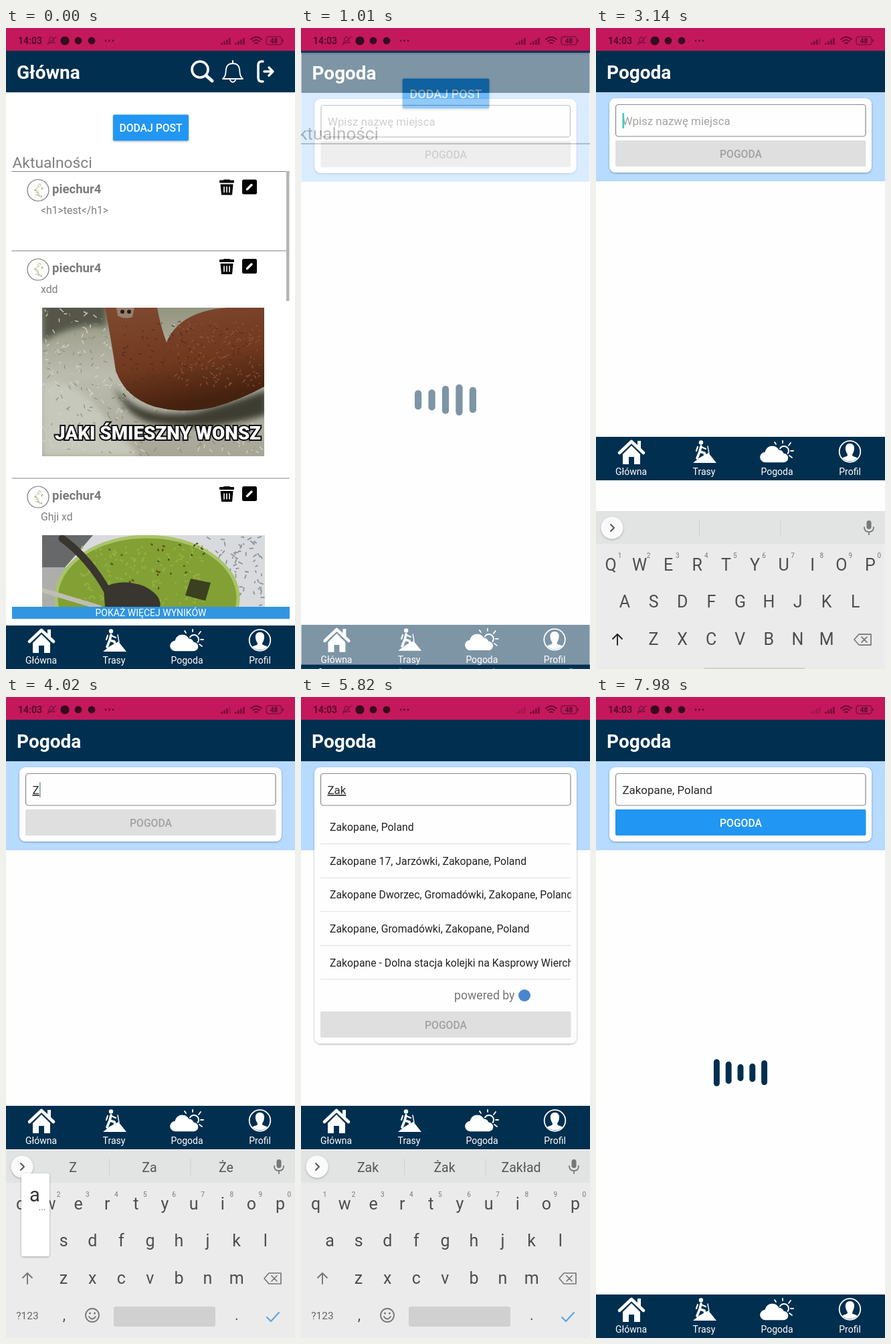
An HTML page for the animation above (8000 ms loop, 432 by 958 pixels).

```html
<!DOCTYPE html>
<html lang="pl">
<head>
<meta charset="utf-8">
<title>Pogoda</title>
<style>
  html, body { margin: 0; width: 100%; height: 100%; overflow: hidden; background: #fff; }
  svg { display: block; width: 100%; height: 100%; font-family: Roboto, sans-serif; }
</style>
</head>
<body>
<svg viewBox="0 0 432 958">
  <defs>
    <filter id="soft" x="-10%" y="-10%" width="120%" height="125%">
      <feDropShadow dx="0" dy="1" stdDeviation="1.6" flood-opacity=".32"/>
    </filter>
    <filter id="blur"><feGaussianBlur stdDeviation="5"/></filter>
    <linearGradient id="fur" x2=".3" y2="1">
      <stop stop-color="#7f4a31"/><stop offset=".6" stop-color="#71391f"/><stop offset="1" stop-color="#45210f"/>
    </linearGradient>
    <linearGradient id="hay" x2="0" y2="1">
      <stop stop-color="#93957f"/><stop offset=".45" stop-color="#bbbcae"/><stop offset="1" stop-color="#a5a696"/>
    </linearGradient>
  </defs>
  <defs id="parts"></defs>
  <g id="stage"></g>
</svg>
<script>
const LOOP = 8000, NAVY = '#002f4f', BLUE = '#2196f3';
const clamp = v => Math.min(1, Math.max(0, v));
const span = (t, from, to) => clamp((t - from) / (to - from));
const easeOut = (u, power = 3) => 1 - (1 - u) ** power;

// SVG helpers
const text = (x, y, size, str, fill = '#333', more = '') =>
  `<text x="${x}" y="${y}" font-size="${size}" fill="${fill}" ${more}>${str}</text>`;
const mid = (x, y, size, str, fill, more = '') => text(x, y, size, str, fill, `text-anchor="middle" ${more}`);
const rect = (x, y, w, h, fill, r = 0, more = '') =>
  `<rect x="${x}" y="${y}" width="${w}" height="${h}" rx="${r}" fill="${fill}" ${more}/>`;
const circle = (x, y, r, fill, more = '') => `<circle cx="${x}" cy="${y}" r="${r}" fill="${fill}" ${more}/>`;
const shape = (d, fill, more = '') => `<path d="${d}" fill="${fill}" ${more}/>`;
const line = (d, color, width = 1) =>
  `<path d="${d}" fill="none" stroke="${color}" stroke-width="${width}" stroke-linecap="round" stroke-linejoin="round"/>`;
const clip = (x, y, w, h, body) =>
  `<svg x="${x}" y="${y}" width="${w}" height="${h}" viewBox="${x} ${y} ${w} ${h}">${body}</svg>`;
const group = (id, body) => `<g id="${id}">${body}</g>`;
const use = (id, x = 0, y = 0) => `<use href="#${id}" x="${x}" y="${y}"/>`;
const BOLD = 'font-weight="700"', MEDIUM = 'font-weight="500"', BLURRED = 'filter="url(#blur)"';

function seeded(seed) {
  return () => (seed = (seed * 16807) % 2147483647) / 2147483647;
}

// Short random strokes spread over a box
function strands(seed, count, x, y, w, h, length) {
  const rnd = seeded(seed);
  let d = '';
  for (let i = 0; i < count; i++) {
    const dx = (rnd() - .5) * length, dy = (rnd() - .5) * length;
    d += `M${(x + rnd() * w).toFixed(1)} ${(y + rnd() * h).toFixed(1)}l${dx.toFixed(1)} ${dy.toFixed(1)}`;
  }
  return d;
}

const topIcons =
  circle(290, 62, 12, 'none', 'stroke="#fff" stroke-width="3.6"') + line('M299 71L308 79', '#fff', 5) +
  line('M324 76C330 71 328 66 329 61C330 55 334 53 339 53C344 53 348 55 349 61C350 66 348 71 354 76Z', '#fff', 1.8) +
  line('M339 52V49M335 78Q339 84 343 78', '#fff', 2) +
  line('M384 50H382Q377 50 377 56V74Q377 80 382 80H384', '#fff', 3.6) +
  line('M386 65H398M393 59L399 65L393 71', '#fff', 3.4);

const tabIcons =
  line('M35 917L53 900L71 917', '#fff', 4.6) + shape('M62 899H67V911L62 906Z', '#fff') +
  shape('M53 906L66 919V934H57V923H49V934H40V919Z', '#fff') +
  circle(157, 901.5, 3.2, '#fff') + shape('M145 932L155 924L168 917L180 932Z', '#fff') +
  line('M157 907L155 915L151 925M155 915L162 917L163 921', '#fff', 3.6) +
  line('M157 908L164 911M152 908L150 914', '#fff', 2.2) + line('M167 907L169 918', '#fff', 1.4) +
  circle(281, 914, 7, 'none', 'stroke="#fff" stroke-width="2"') +
  line('M269 904L267 901M279 902V899M288 906L291 902M291 914H295M289 921L293 924', '#fff', 1.8) +
  shape('M254 932A8 8 0 0 1 252 915A12 12 0 0 1 274 912A8 8 0 0 1 281 917A7.5 7.5 0 0 1 280 932Z', '#fff', `stroke="${NAVY}" stroke-width="1.5"`) +
  circle(379.5, 915, 15.8, 'none', 'stroke="#fff" stroke-width="1.8"') +
  shape('M379.5 903C373 903 372 909 373.5 914C374 917 376 918 376 921C374 923 370 923 368 925Q379.5 934 391 925C389 923 385 923 383 921C383 918 385 917 385.5 914C387 909 386 903 379.5 903Z', '#fff');

const tabs = rect(0, 893, 432, 65, NAVY) + tabIcons +
  ['Główna', 'Trasy', 'Pogoda', 'Profil'].map((label, i) => mid(52.5 + 109 * i, 950, 14, label, '#fff')).join('');

const llama = clip(54, 418, 332, 222,
  rect(54, 418, 332, 222, 'url(#hay)') +
  shape('M54 410H150V446Q100 440 54 470Z', '#54574a', BLURRED) +
  shape('M54 530Q90 520 130 560L200 640H54Z', '#c6c8bb', BLURRED) +
  line(strands(7, 260, 58, 422, 324, 214, 11), '#d2d3c6', 1.3) +
  line(strands(23, 220, 58, 422, 324, 214, 10), '#85877a', 1.1) +
  shape('M160 535Q200 590 290 572Q350 556 390 540V578Q300 606 215 590Q180 580 160 535Z', '#3c3c32', BLURRED) +
  shape('M148 418H226Q231 446 240 470Q256 430 312 420L330 418H386V536Q350 556 310 567Q265 577 222 566Q178 552 164 512Q158 470 148 418Z', 'url(#fur)') +
  shape('M165 418H192L189 432Q177 436 167 430Z', '#96806f') + circle(174, 424, 3, '#2b1a14') + circle(184, 424, 3, '#2b1a14') +
  line(strands(41, 150, 254, 436, 126, 100, 8), '#8d553b', 1.2) +
  line(strands(53, 130, 174, 440, 190, 112, 8), '#55291a', 1.2) +
  mid(227, 615, 27.8, 'JAKI ŚMIESZNY WONSZ', '#fff', 'font-weight="900" stroke="#111" stroke-width="4" paint-order="stroke"'));

const bowl = clip(54, 758, 333, 107,
  rect(54, 758, 333, 107, '#d9dadd') + line(strands(11, 90, 300, 760, 85, 103, 10), '#8d929c', 1.8) +
  shape('M54 758H130L76 820H54Z', '#66686a') + rect(54, 806, 40, 59, '#adaeac') +
  `<ellipse cx="211" cy="852" rx="136" ry="92" fill="#82a033" stroke="#a9c46a" stroke-width="5"/>` +
  line(strands(31, 140, 110, 775, 190, 88, 6), '#93b045', 2.4) +
  line(strands(17, 30, 150, 770, 150, 80, 4), '#4e4a1d', 2.2) +
  shape('M276 823L306 829L298 856L268 848Z', '#3a4020') +
  line('M84 763Q124 792 152 842', '#39352f', 11) +
  shape('M146 836Q172 822 206 834Q234 848 230 866H148Z', '#39352f') +
  line('M54 840L140 866', '#bfbdb4', 7));

const post = (y, body) => line(`M9 ${y}H423`, '#808080', 1.2) +
  circle(48, y + 28, 16, '#fdfdfb', 'stroke="#777" stroke-width="1.2"') +
  line(strands(9, 16, 42, y + 18, 13, 20, 7), '#a9ad80', 1) +
  text(69, y + 32, 18.6, 'piechur4', '#7b7b7b', BOLD) +
  rect(319, y + 13, 22, 4, '#000', 1) + rect(325, y + 12, 10, 3, '#000', 1) +
  shape(`M320.5 ${y + 19}H339.5L338 ${y + 35}H322Z`, '#000') +
  line(`M326 ${y + 23}V${y + 31}M330 ${y + 23}V${y + 31}M334 ${y + 23}V${y + 31}`, '#fff', 1.6) +
  rect(353, y + 12, 22, 22, '#000', 2.5) + line(`M360.5 ${y + 26.5}L367 ${y + 20}`, '#fff', 3.4) +
  text(52, y + 63, 15.8, body, '#808080');

const feed = post(214.5, '&lt;h1&gt;test&lt;/h1&gt;') + post(333, 'xdd') + llama + post(673, 'Ghji xd') + bowl +
  rect(419, 214, 4.5, 194, '#b5b5b5') + rect(9, 865, 415, 18, '#3195e0') +
  mid(216.5, 879, 14, 'POKAŻ WIĘCEJ WYNIKÓW', '#fff');

const screen = (title, background) => rect(0, 34, 432, 924, background) + rect(0, 96, 432, 2, '#e7e9eb') +
  rect(0, 34, 432, 62, NAVY) + text(16, 76, 28, title, '#fff', BOLD);

const homeTop = screen('Główna', '#fff') + topIcons +
  rect(160, 129.5, 113, 39, BLUE, 2, 'filter="url(#soft)"') +
  mid(216.5, 155, 15.7, 'DODAJ POST', '#fff', MEDIUM) +
  text(9.5, 209, 22.8, 'Aktualności', '#808080') + line('M9 214.5H423', '#808080', 1.2) + use('tabs');

const PLACES = ['Zakopane, Poland', 'Zakopane 17, Jarzówki, Zakopane, Poland',
  'Zakopane Dworzec, Gromadówki, Zakopane, Poland', 'Zakopane, Gromadówki, Zakopane, Poland',
  'Zakopane - Dolna stacja kolejki na Kasprowy Wierch'];
const places = clip(29, 166, 374.5, 300,
  PLACES.map((place, i) => text(43, 200 + 50.7 * i, 15.8, place, '#222') +
    line(`M29 ${219.5 + 50.6 * i}H404`, '#dedede')).join('') +
  text(229, 452, 17.7, 'powered by', '#757575') + circle(334, 446, 9, '#4a86cf'));

const signal = (x, full, faint) => [0, 1, 2, 3].map(i =>
  rect(x + i * 4, 22 - i * 2.4, 2.8, 3 + i * 2.4, '#6b0c34', 0, `opacity="${i < full ? (faint ? .35 : .8) : .3}"`)).join('');
const statusBar = rect(0, 0, 432, 34, '#c4185c') + text(18, 24, 14, '14:03', '#560a2b', BOLD) +
  line('M63 22H73L71 19V16Q68 11 65 16V19ZM62 25L75 13', '#7a1240', 1.3) +
  [88, 108, 128].map((x, i) => circle(x, 19, i ? 5.4 : 6.6, '#360a1e')).join('') +
  [149, 154.5, 160].map(x => circle(x, 19, 1.4, '#560a2b')).join('') +
  line('M366 17Q374 10 382 17M369 20Q374 15.5 379 20M372 23Q374 21 376 23', '#6b0c34', 2) +
  rect(389, 13, 23, 12, 'none', 3.5, 'stroke="#7a1240" stroke-width="1.5"') + rect(413, 17, 2, 4, '#7a1240') +
  mid(400.5, 23, 10, '48', '#560a2b', BOLD);

document.getElementById('parts').innerHTML = group('tabs', tabs) + group('feed', feed) +
  group('homeTop', homeTop) + group('places', places) + group('statusBar', statusBar);

// Keyboard
const ROWS = [['qwertyuiop', 22, 766], ['asdfghjkl', 43, 821], ['zxcvbnm', 86, 877]];
const HINTS = { '': [], Z: ['Z', 'Za', 'Że'], Za: ['Za', 'Ża', 'Zaś'], Zak: ['Zak', 'Żak', 'Zakład'] };

function keyboard(typed, pressed, caps) {
  const keyCase = key => caps ? key.toUpperCase() : key;
  let out = rect(0, 677, 432, 281, '#ebebeb') + rect(0, 677, 432, 49, '#e2e3e3') +
    circle(24, 702, 16.5, '#fafafa', 'filter="url(#soft)"') + line('M22 697L27 702L22 707', '#555', 2) +
    line('M154.5 690V714M276 690V714', '#d0d0d0') +
    (HINTS[typed] || HINTS.Zak).map((word, i) => mid(100 + 114.5 * i, 710, 19.5, word, '#555')).join('') +
    rect(404.5, 691, 7, 13, '#777', 3.5) + line('M401 701Q401 708 408 708Q415 708 415 701M408 708V712', '#777', 1.8);
  let bubble = '';
  for (const [keys, x0, y] of ROWS) [...keys].forEach((key, i) => {
    const x = x0 + 43.1 * i;
    out += mid(x, y, 25, keyCase(key), '#4e4e4e');
    if (y === 766) out += mid(x + 13.5, 747, 10, (i + 1) % 10, '#777');
    if (key === pressed) bubble = rect(x - 20, y - 109, 42, 124, '#fff', 4, 'filter="url(#soft)"') +
      mid(x, y - 67, 29, keyCase(key), '#333') + mid(x + 11, y - 54, 13, '...', '#555');
  });
  out += line('M32 877V862M25 868L32 861L39 868', caps ? '#222' : '#777', 1.9) +
    line('M386 869L393 861H411V877H393ZM397 865L405 873M405 865L397 873', '#777', 1.7) +
    mid(32, 930, 15.5, '?123', '#666') + mid(87, 931, 22, ',', '#4e4e4e') + mid(345, 931, 22, '.', '#4e4e4e') +
    circle(129, 924, 10, 'none', 'stroke="#777" stroke-width="1.8"') + circle(125.5, 921, 1.5, '#777') +
    circle(132.5, 921, 1.5, '#777') + line('M124 926Q129 933 134 926', '#777', 1.8) +
    rect(161, 911, 152, 30, '#d0d0d0', 3) + line('M390 927L396 933L408 920', '#5aa7de', 2.2);
  return out + bubble;
}

// Five bars with a travelling wave; peak is the index of the tallest bar
function loader(cy, gap, peak) {
  let out = '';
  for (let i = 0; i < 5; i++) {
    const h = gap * (1.84 + .45 * Math.cos((i - peak) * Math.PI * 2 / 5)), w = gap / 2;
    out += rect(216 + (i - 2) * gap - w / 2, cy - h / 2, w, h, NAVY, w / 2);
  }
  return out;
}

const TYPED = [[5890, 'Zakopane, Poland'], [4300, 'Zak'], [4100, 'Za'], [3870, 'Z'], [0, '']];
const PRESSES = [[3810, 3950, 'z'], [4020, 4110, 'a'], [4220, 4320, 'k']];
const CURSOR = [[2870, 3370], [3810, 4890], [5350, 5820]];
const within = (t, [from, to]) => t >= from && t < to;

function weather(t) {
  const typed = TYPED.find(([from]) => t >= from)[1];
  const done = t >= 5890, open = t >= 4500 && !done, drop = open ? 302 : 0;
  const glow = Math.sin(Math.PI * span(t, 7220, 7520));
  let out = screen('Pogoda', '#fefefe') +
    rect(0, 96, 432, 133, '#b7daff') + rect(20, 105, 392, 111 + drop, '#fefefe', 9, 'filter="url(#soft)"') +
    rect(29.5, 114.5, 373.5, 47.5, '#fefefe', 4, 'stroke="#888" stroke-width="1.2"') +
    (typed ? text(39.5, 145, 16.9, typed, '#2a2a2a', done ? '' : 'text-decoration="underline"')
           : text(39.5, 145, 16.9, 'Wpisz nazwę miejsca', '#a3a3a3')) +
    rect(29, 168 + drop, 374.5, 39, done ? BLUE : '#dfdfdf', 2) +
    rect(29, 168 + drop, 374.5, 39, '#fff', 2, `opacity="${.25 * glow}"`) +
    mid(216.5, 194 + drop, 15.7, 'POGODA', done ? '#fff' : '#a1a1a1', MEDIUM);
  if (open) out += use('places');
  if (CURSOR.some(range => within(t, range)))
    out += typed ? rect(40 + [0, 10, 19, 27][typed.length], 127, 1.6, 23, '#8a9a98') : rect(39.5, 127, 2.6, 23, '#3bcdb9');
  if (t < 1080) out += loader(556, 20.5, 2.85 + (t - 1010) / 240);
  if (t >= 7350) out += loader(561.5, 17.8, 4.8 + (t - 7980) / 240);

  const raised = within(t, [3010, 5890]);
  out += use('tabs', 0, raised ? -282 : 0);
  const shown = t < 5890 ? easeOut(span(t, 2940, 3380)) : 1 - span(t, 5890, 6200) ** 2;
  if (shown > 0) {
    const press = PRESSES.find(range => within(t, range));
    out += `<g transform="translate(0 ${281 * (1 - shown)})">${keyboard(typed, press && press[2], t < 3950)}</g>`;
  }
  return out;
}

// Scales a screen about the middle of the area below the status bar
const zoom = (scale, body, opacity = 1) =>
  `<g opacity="${opacity}" transform="translate(216 496) scale(${scale}) translate(-216 -496)">${body}</g>`;

function scene(t) {
  let out = '';
  if (t < 1080) {
    const p = easeOut(span(t, 330, 1080), 1.7);
    out += zoom(1 + .15 * p, use('homeTop') + (t < 480 ? use('feed') : ''));
    if (t > 940) out += zoom(.85 + .15 * p, weather(t), span(t, 940, 1080));
  } else {
    out += weather(t);
  }
  return out + use('statusBar') + signal(321, t < 1480 ? 4 : 3, t >= 4300) + signal(342, 4, false);
}

const stage = document.getElementById('stage');
const start = performance.now();
function frame() {
  stage.innerHTML = scene((performance.now() - start) % LOOP);
  requestAnimationFrame(frame);
}
frame();
</script>
</body>
</html>
```
